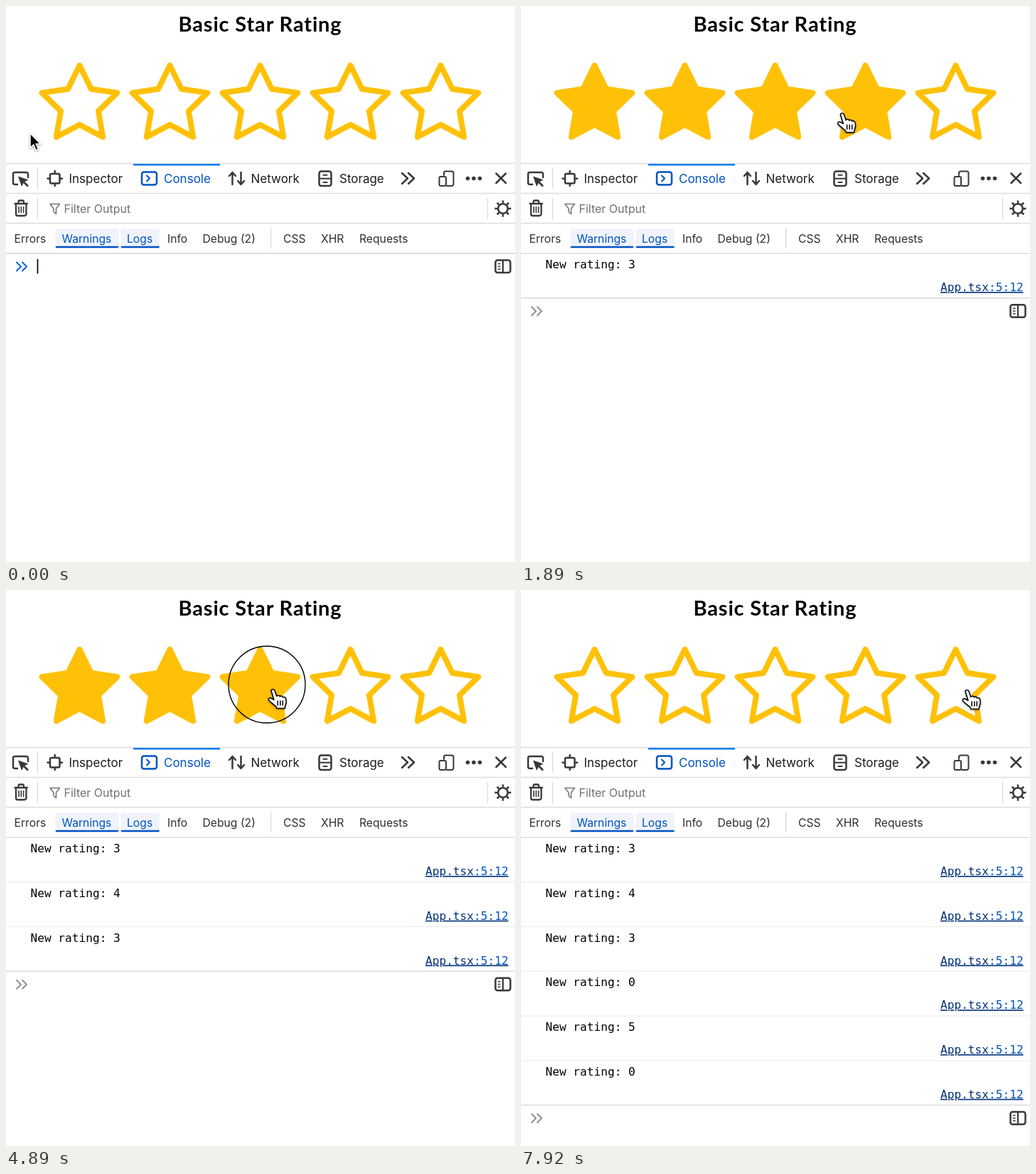
An HTML page that plays this animation: 716 px wide and 782 px high, repeating every 8.58 s.

```html
<!DOCTYPE html>
<html lang="en">
<head>
<meta charset="utf-8">
<title>Basic Star Rating</title>
<style>
  html, body { margin: 0; width: 100%; height: 100%; overflow: hidden; background: #fff; }
  svg { display: block; width: 716px; height: 782px; }
  .title { font: 700 29px Lato, sans-serif; letter-spacing: .85px; text-anchor: middle; }
  .tabs { font: 17px Inter, sans-serif; fill: #1c1b22; }
  .filters { font: 15.7px Inter, sans-serif; fill: #2e2e33; }
  .mono { font: 16.15px "DejaVu Sans Mono", monospace; }
  .link { fill: #003078; text-decoration: underline; text-decoration-thickness: 1px; text-underline-offset: 2px; }
  .link tspan { fill: #0053b8; }
  .active { fill: #0052c2; }
  .rule { stroke: #dcdce0; stroke-width: 1.5; fill: none; }
  .icon { fill: none; stroke: #38383d; stroke-width: 2.5; stroke-linecap: round; stroke-linejoin: round; }
  .icon.blue { stroke: #0052c2; }
  .thin { stroke-width: 1.6; }
  .solid { fill: #38383d; stroke: none; }
  .star { fill: none; stroke: #ffc107; stroke-width: 1.5; stroke-linejoin: round; }
  .star.on { fill: #ffc107; }
  .shadow { filter: drop-shadow(0 1.5px 1.5px rgba(0, 0, 0, .4)); }
</style>
</head>
<body>
<svg viewBox="0 0 716 782">
  <defs>
    <path id="star" d="M12 2l3.09 6.26L22 9.27l-5 4.87 1.18 6.88L12 17.77l-6.18 3.25L7 14.14 2 9.27l6.91-1.01z"/>
  </defs>
  <text class="title" x="357.5" y="36">Basic Star Rating</text>
  <g id="stars"></g>

  <path class="rule" d="M0 221.5H716M0 263.5H716M0 305.5H716M0 348H716M44.5 227V257M44.5 270V300M677.5 270V300M372.5 312V341"/>
  <rect x="179" y="222" width="122" height="2.5" fill="#0a7ff0"/>

  <!-- tab bar -->
  <g class="icon">
    <path d="M16 251H12.5a2.5 2.5 0 0 1-2.5-2.5V236.5a2.5 2.5 0 0 1 2.5-2.5H28.5a2.5 2.5 0 0 1 2.5 2.5V241"/>
    <path class="solid" d="M17 239.5L31.5 244.5 26.5 247 32 252.5 30 254.5 24.5 249 22 254z"/>
    <rect x="62" y="236" width="13.5" height="13.5" rx="2"/>
    <path d="M68.7 232V235M68.7 250V253M58.5 242.7H61M76 242.7H79"/>
    <path d="M318.500 251V234M314 239L318.5 234 323 239M330.5 234V251M326 246L330.5 251 335 246"/>
    <rect x="440.5" y="232.5" width="17" height="20.5" rx="3"/>
    <path d="M441 242.7H457M446.5 237.7H451.5M446.5 248H451.5" stroke-width="2"/>
    <path d="M557 235L565 242.5 557 250M566 235L574 242.5 566 250"/>
    <path d="M616 238V235a2.5 2.5 0 0 1 2.5-2.5H627a2.5 2.5 0 0 1 2.5 2.5V250.5a2.5 2.5 0 0 1-2.5 2.5H620" stroke-width="2"/>
    <rect x="609.5" y="240" width="9.5" height="13" rx="2" stroke-width="2"/>
    <path d="M689.5 235.5L703 249M703 235.5L689.5 249"/>
    <g class="solid">
      <circle cx="649.5" cy="242.5" r="2.8"/><circle cx="658" cy="242.5" r="2.8"/><circle cx="666.5" cy="242.5" r="2.8"/>
    </g>
  </g>
  <g class="icon blue">
    <rect x="191" y="233.5" width="21" height="18" rx="3"/>
    <path d="M198 238.5L202 242.5 198 246.5" stroke-width="2"/>
  </g>
  <g class="tabs">
    <text x="88.5" y="248.5">Inspector</text>
    <text x="222" y="248.5" class="active">Console</text>
    <text x="344.5" y="248.5">Network</text>
    <text x="469" y="248.5">Storage</text>
  </g>

  <!-- filter input -->
  <g class="icon">
    <path d="M12.5 278H30M17.5 277V275.5a2 2 0 0 1 2-2H23a2 2 0 0 1 2 2V277M14 278.5V292.5a2.5 2.5 0 0 0 2.5 2.5H26a2.5 2.5 0 0 0 2.5-2.5V278.5" stroke-width="2.3"/>
    <path class="thin" d="M18 282.5V290.5M21.3 282.5V290.5M24.6 282.5V290.5"/>
    <path class="thin" stroke="#77777c" d="M62 278.5H75.5L70.5 285V292.5L67 289.5V285z"/>
    <circle cx="699" cy="285" r="6.8" stroke-width="2.6"/>
    <circle cx="699" cy="285" r="9.5" stroke-width="4" stroke-linecap="butt" pathLength="80" stroke-dasharray="3.4 6.6" stroke-dashoffset="1.7"/>
  </g>
  <text x="81.5" y="290.5" font-family="Inter, sans-serif" font-size="16" fill="#707075">Filter Output</text>

  <!-- category filters -->
  <g fill="#f0f4fa">
    <rect x="69.5" y="313" width="89" height="27" rx="3"/>
    <rect x="161.5" y="313" width="54.5" height="27" rx="3"/>
  </g>
  <path d="M71 339H157M163 339H214.5" stroke="#0052c2" stroke-width="2.6" stroke-linecap="round"/>
  <g class="filters">
    <text x="11.5" y="333">Errors</text>
    <text x="78.5" y="333" class="active">Warnings</text>
    <text x="170" y="333" class="active">Logs</text>
    <text x="227" y="333">Info</text>
    <text x="276.5" y="333">Debug (2)</text>
    <text x="390" y="333">CSS</text>
    <text x="443" y="333">XHR</text>
    <text x="497" y="333">Requests</text>
  </g>

  <g id="logs"></g>
  <g id="prompt">
    <path class="rule" d="M0 348H716"/>
    <path id="chevrons" class="icon" style="stroke-width:2" d="M15 360.5L21 366.5 15 372.5M23 360.5L29 366.5 23 372.5"/>
    <path id="caret" d="M44.5 356V376.5" stroke="#000" stroke-width="1.7"/>
    <g class="icon">
      <rect x="688.5" y="357.5" width="21" height="17.5" rx="3"/>
      <path d="M699 358V375" stroke-width="2.2"/>
      <path class="thin" d="M692.5 362.5H695M692.5 366.2H695M692.5 370H695"/>
    </g>
  </g>

  <circle id="ring" fill="none" stroke="#000" stroke-width="1.4"/>
  <g id="cursor">
    <path id="arrow" class="shadow" transform="translate(1 1)" fill="#000" stroke="#fff" stroke-width="1.6" d="M0 0V20.5L4.7 16.2 8.2 24 11.6 22.5 8.2 15H14.6z"/>
    <g id="hand" class="shadow" stroke="#000" stroke-width="1.5" stroke-linejoin="round" stroke-linecap="round">
      <path fill="#fff" d="M-3 1.5C-2.5-1 1-1 2 1.5L4.8 9.5C5.5 7.5 9 7.8 9.3 10 10.5 8.3 13 9 13.4 11 15 9.7 17.3 11 17.6 13 18.5 16 18.5 19 17 22L16 26.5H5L4 24C1 21.5-3 18.5-6 15.5-8 12.5-5 11-2.5 12.5L1 14.5z"/>
      <path d="M6.2 16V22M9.8 16V22M13.3 16V22"/>
    </g>
  </g>
</svg>
<script>
const LOOP = 8580, STEP = 30, ROW = 62.75, PITCH = 127, LEFT = 40;
const RING_TIME = 240, RING_RADIUS = 54;

// pointer stops: time, x, y
const path = [
  [0, 33, 178], [870, 371, 148], [1590, 371, 148], [2100, 500, 153], [2820, 500, 153],
  [3120, 376, 140], [5820, 376, 140], [6390, 671, 140], [6510, 671, 140],
  [6690, 625, 141], [7050, 625, 141], [7170, 628, 141], [LOOP, 628, 141]
];
const clicks = [
  { down: 900, up: 1200, rating: 3 },
  { down: 2130, up: 2430, rating: 4 },
  { down: 3330, up: 3570, rating: 3 },
  { down: 4890, up: 5160, rating: 0 },
  { down: 6720, up: 7020, rating: 5 },
  { down: 7620, up: 7920, rating: 0 }
];

const el = id => document.getElementById(id);
const show = (node, on) => { node.style.display = on ? "" : "none"; };

el("stars").innerHTML = [0, 1, 2, 3, 4].map(i =>
  `<use href="#star" class="star" transform="translate(${LEFT + i * PITCH} 73) scale(${PITCH / 24})"/>`).join("");
el("logs").innerHTML = clicks.map((c, i) =>
  `<g class="mono" transform="translate(0 ${i * ROW})">
    <text x="34.5" y="369">New rating: ${c.rating}</text>
    <text x="590" y="401" class="link">App.tsx<tspan>:5:12</tspan></text>
    <path d="M0 410.75H716" stroke="#efeff1" stroke-width="1.3"/>
  </g>`).join("");
const stars = [...el("stars").children], logs = [...el("logs").children];

function pointer(t) {
  const i = Math.max(1, path.findIndex(p => p[0] >= t));
  const [t0, x0, y0] = path[i - 1], [t1, x1, y1] = path[i];
  const u = Math.max(0, (t - t0) / (t1 - t0)), s = u * u * (3 - 2 * u);
  return [x0 + (x1 - x0) * s, y0 + (y1 - y0) * s];
}

const hovered = x => Math.floor((x - LEFT) / PITCH) + 1;

// Clearing the rating empties the stars until another one is entered.
function filledStars(t) {
  const hover = hovered(pointer(t - STEP)[0]);
  if (t >= clicks[5].up || (t >= clicks[3].up && hover < 4)) return 0;
  return hover;
}

function draw(t) {
  const [x, y] = pointer(t), filled = filledStars(t), onStar = hovered(x) > 0;
  stars.forEach((s, i) => s.classList.toggle("on", i < filled));

  const count = clicks.filter(c => t >= c.up).length;
  logs.forEach((row, i) => show(row, i < count));
  el("prompt").setAttribute("transform", `translate(0 ${count * ROW})`);
  const focused = t < clicks[0].down;
  el("chevrons").style.stroke = focused ? "#0060df" : "#8f8f96";
  show(el("caret"), focused && t < 510);

  el("cursor").setAttribute("transform", `translate(${x} ${y})`);
  show(el("arrow"), !onStar);
  show(el("hand"), onStar);

  const press = clicks.find(c => t >= c.down && t < c.down + RING_TIME);
  show(el("ring"), press);
  if (press) {
    const k = 1 - (t - press.down) / RING_TIME;
    el("ring").setAttribute("cx", x - 9 * k);
    el("ring").setAttribute("cy", y - 7 * k);
    el("ring").setAttribute("r", RING_RADIUS * k);
  }
}

const start = performance.now();
function tick() {
  const t = (performance.now() - start) % LOOP;
  draw(Math.floor(t / STEP) * STEP);
  requestAnimationFrame(tick);
}
tick();
</script>
</body>
</html>
```
